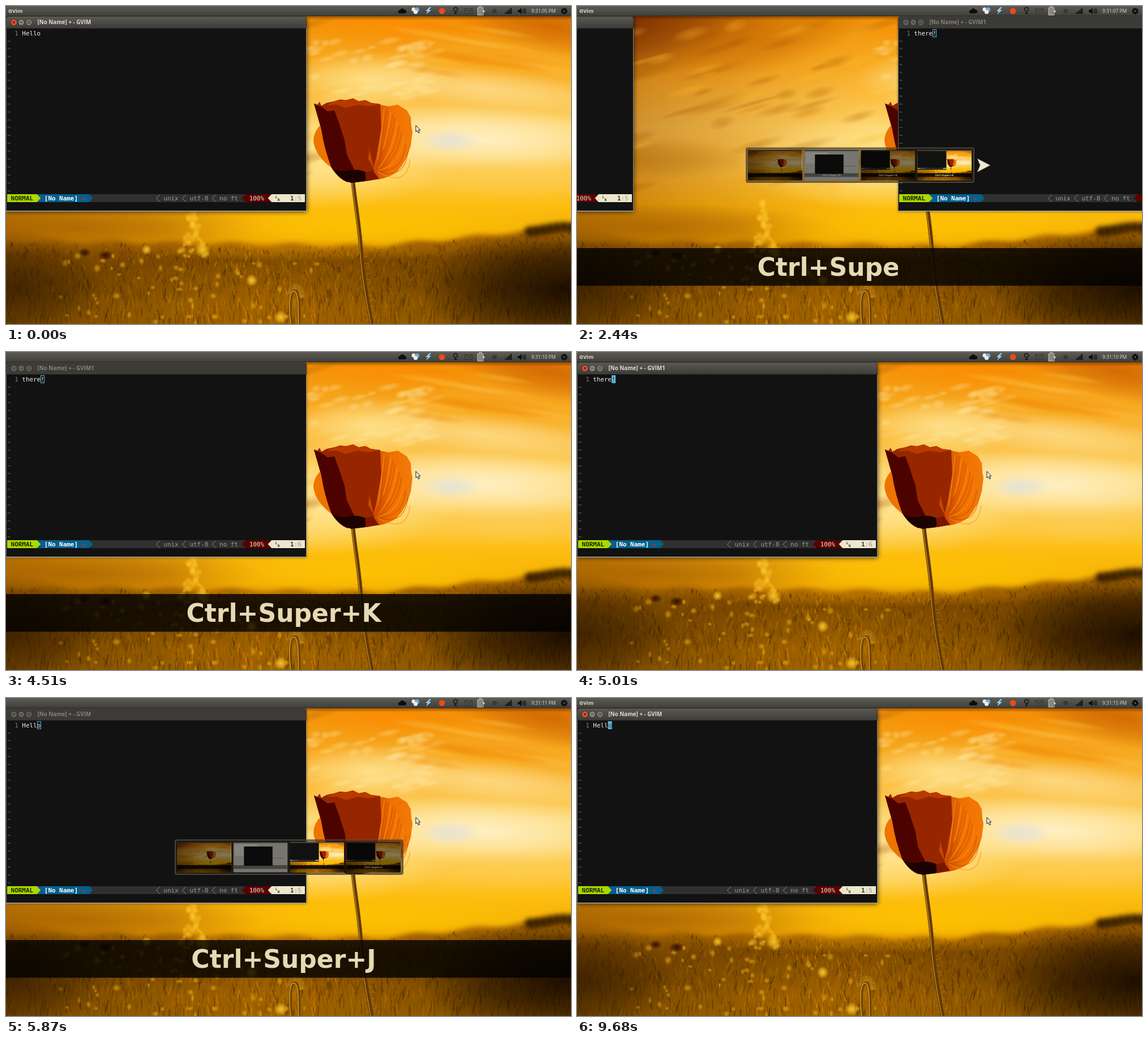
Recreate the animation shown at these times as an HTML page with a canvas. Size 998 by 561 pixels, loop 9.81 s.

```html
<!DOCTYPE html>
<html lang="en">
<head>
<meta charset="utf-8">
<title>Workspace switching</title>
<style>
html, body { margin: 0; width: 100%; height: 100%; overflow: hidden; background: #000; }
canvas { display: block; width: 998px; height: 561px; }
</style>
</head>
<body>
<canvas id="stage" width="998" height="561"></canvas>
<script>
const W = 998, H = 561, LOOP = 9810;
const UI = '"Open Sans", "Noto Sans", sans-serif';
const MONO = '"DejaVu Sans Mono", monospace';
const CELL = 6.58;
const stage = document.getElementById('stage').getContext('2d');
let c = stage;

// ---------- helpers ----------
function rect(x, y, w, h, fill) { c.fillStyle = fill; c.fillRect(x, y, w, h); }

function shape(d, fill, stroke, width = 1) {
  const p = new Path2D(d);
  if (fill) { c.fillStyle = fill; c.fill(p); }
  if (stroke) { c.strokeStyle = stroke; c.lineWidth = width; c.stroke(p); }
}

function disc(x, y, r, fill) {
  c.fillStyle = fill;
  c.beginPath();
  c.arc(x, y, r, 0, 7);
  c.fill();
}

function text(s, x, y, font, fill, align = 'left') {
  c.font = font;
  c.fillStyle = fill;
  c.textAlign = align;
  c.fillText(s, x, y);
}

function ramp(x0, y0, x1, y1, ...stops) {
  const g = c.createLinearGradient(x0, y0, x1, y1);
  stops.forEach(([at, color]) => g.addColorStop(at, color));
  return g;
}

// soft elliptical glow; rgb is "r,g,b"
function glow(x, y, rx, ry, rgb, a, turn = 0) {
  c.save();
  c.translate(x, y);
  c.rotate(turn);
  c.scale(rx, ry);
  const g = c.createRadialGradient(0, 0, 0, 0, 0, 1);
  g.addColorStop(0, `rgba(${rgb},${a})`);
  g.addColorStop(.5, `rgba(${rgb},${a * .6})`);
  g.addColorStop(1, `rgba(${rgb},0)`);
  rect(-1, -1, 2, 2, g);
  c.restore();
}

let seed = 7;
const rnd = () => (seed = seed * 16807 % 2147483647) / 2147483647;
const between = (a, b) => a + (b - a) * rnd();

// ---------- wallpaper ----------
const horizon = x => x < 650 ? 412 + x / 50 : 425 - (x - 650) * .105;

function drawSky() {
  rect(0, 0, W, H, ramp(0, 0, 0, 430, [0, '#f08c00'], [.25, '#f8ac24'], [.5, '#fdd468'],
    [.68, '#fccb4c'], [.82, '#fdbd10'], [1, '#eea600']));
  rect(0, 0, W, H, ramp(0, 0, 520, 0, [0, 'rgba(150,76,0,.62)'], [.5, 'rgba(185,100,0,.35)'], [1, 'rgba(220,130,0,0)']));
  glow(60, 30, 330, 110, '95,22,0', .75, -.15);
  glow(330, 60, 200, 55, '190,95,0', .5, -.25);
  glow(90, 270, 230, 40, '160,88,0', .4);
  glow(130, 390, 330, 42, '150,85,0', .55);
  glow(540, 275, 260, 85, '255,236,165', .75);
  glow(640, 130, 150, 50, '255,236,160', .75);
  glow(840, 145, 230, 36, '255,234,170', .6, .1);
  glow(840, 235, 280, 60, '255,243,205', .9, .04);
  glow(785, 238, 55, 22, '228,226,215', .9);
  glow(900, 305, 220, 36, '255,206,90', .55);
  glow(960, 35, 200, 50, '195,85,0', .65, .2);
  glow(690, 35, 190, 42, '255,138,0', .6);
  glow(640, 390, 350, 45, '255,198,0', .75);
  for (let i = 0; i < 75; i++) {
    const x = between(0, 560), y = between(25, 330);
    const dark = i % 2;
    glow(x, y, between(18, 70), between(4, 13), dark ? '165,84,0' : '255,184,45', dark ? .3 : .35, -.28);
  }
  for (let i = 0; i < 45; i++) {
    glow(between(535, 760), between(60, 165), between(8, 28), between(4, 9), '255,238,175', .35, -.2);
  }
  for (let i = 0; i < 14; i++) {
    glow(between(720, 990), between(30, 130), between(50, 120), between(6, 13), i % 2 ? '240,135,0' : '255,195,70', .4, .15);
  }
}

function drawField() {
  c.save();
  c.filter = 'blur(4px)';
  c.beginPath();
  c.moveTo(-20, H + 20);
  for (let x = -20; x <= W + 20; x += 10) c.lineTo(x, horizon(x) + 3 * Math.sin(x / 17));
  c.lineTo(W + 20, H + 20);
  c.fillStyle = ramp(0, 400, 0, H, [0, '#b87000'], [.25, '#7c4900'], [.6, '#704200'], [1, '#8a5500']);
  c.fill();
  for (let x = 925; x < 1010; x += 12) disc(x, 394 + 4 * Math.sin(x), 9, '#3a2000');
  c.restore();
  glow(470, 520, 360, 85, '200,125,0', .5);
  glow(520, 430, 320, 20, '215,140,0', .5);
  for (let i = 0; i < 2600; i++) {
    const x = between(0, W), top = horizon(x) + 6;
    const y = top + rnd() * (H + 10 - top);
    const light = Math.max(0, 1 - Math.abs(x - 440) / 560);
    const len = 4 + (y - 400) / 11;
    c.strokeStyle = `hsla(37,100%,${6 + rnd() * (16 + 32 * light)}%,.32)`;
    c.lineWidth = between(1, 2.6);
    c.beginPath();
    c.moveTo(x, y);
    c.lineTo(x + between(-5, 5), y - len);
    c.stroke();
  }
  for (let i = 0; i < 60; i++) {
    glow(between(90, 560), between(440, 560), between(3, 8), between(3, 8), '255,190,20', .55);
  }
  for (let i = 0; i < 42; i++) {
    const y = between(345, 445), r = between(3, 9);
    glow(328 + (y - 345) * between(-.25, .3), y, r, r, '255,196,40', .6);
  }
  [[434, 484, 11], [485, 549, 12], [248, 430, 9], [347, 430, 14]].forEach(([x, y, r]) => glow(x, y, r, r, '255,200,40', .95));
  glow(139, 435, 11, 8, '50,15,0', .95);
  glow(176, 440, 13, 9, '50,15,0', .95);
  glow(985, 500, 250, 115, '18,7,0', .85);
  glow(0, 500, 170, 110, '35,16,0', .6);
}

function drawStem(d, width, base, edge) {
  c.lineCap = 'round';
  shape(d, null, base, width);
  c.save();
  c.translate(-width / 4, 0);
  shape(d, null, edge, 1.4);
  c.restore();
}

function drawPoppy() {
  for (let i = 0; i < 34; i++) {
    const y = 400 + i * 4.8, x = 625 + (y - 400) * .13, side = i % 2 ? 1 : -1;
    shape(`M${x} ${y}l${side * between(6, 11)} ${between(-4, 3)}`, null, 'rgba(190,130,30,.75)', .8);
  }
  drawStem('M613 311C617 350 624 385 627 430S637 515 647 566', 7, '#633a00', '#c08a2a');
  for (let i = 0; i < 16; i++) {
    const a = -Math.PI * i / 15;
    shape(`M${511 + 8 * Math.cos(a)} ${507 + 8 * Math.sin(a)}l${8 * Math.cos(a)} ${9 * Math.sin(a)}`, null, '#d0982c', .8);
  }
  drawStem('M505 566C500 535 501 502 510 503S517 535 518 566', 5, '#6e4400', '#dca23a');

  shape('M554 211Q543 224 543 238Q546 266 580 289L570 245Z', '#ee7400');
  shape('M660 174L676 177L692 174L708 184L715 196L716 212L718 222L715 246Q708 274 690 293Q676 303 658 306L645 285Z',
    ramp(655, 0, 718, 0, [0, '#d45700'], [.4, '#f07000'], [1, '#f27a08']));
  for (let i = 0; i < 13; i++) {
    const x = 668 + i * 3.8, y = 182 + i * i * .62;
    shape(`M${x} ${y}Q${x - 6} ${y + 52} 654 291`, null, i % 3 ? 'rgba(190,70,0,.55)' : 'rgba(255,145,30,.7)', 1.4);
  }
  shape('M544 172L550 174L554 169L557 176L566 171L580 168L590 165L601 166L613 163L623 168L635 166L645 171L661 173L663 215L655 262L649 287L659 305L636 309L610 312Q588 306 575 285Q563 255 557 218Z', '#962600');
  shape('M544 172L551 176L556 177L568 186L580 184L588 206L598 236L602 262L615 288L604 311Q588 306 575 285Q563 255 557 218Z', '#4c0300');
  shape('M566 175L580 168L601 166L613 163L623 168L635 166L645 171L661 173L640 177L622 174L600 180L585 174Z', '#b83a00');
  shape('M638 235L642 252L640 270L650 288L644 262Z', '#c84800');
  shape('M650 287L661 262L668 250L656 291L659 305L651 300Z', '#ce4b00');
  shape('M576 286Q592 294 606 290Q624 286 640 296L634 309L610 312Q588 306 576 286Z', '#1c0200');
  shape('M634 294L648 290L659 305L636 309Z', '#7a1600');
}

function drawWallpaper() {
  const canvas = document.createElement('canvas');
  canvas.width = W;
  canvas.height = H;
  c = canvas.getContext('2d');
  drawSky();
  drawField();
  drawPoppy();
  rect(0, 17, W, 8, ramp(0, 17, 0, 25, [0, 'rgba(50,15,0,.5)'], [1, 'rgba(50,15,0,0)']));
  c = stage;
  return canvas;
}
const wall = drawWallpaper();

// ---------- editor window ----------
const col = n => 2 + n * CELL;
const mono = (s, n, y, fill, weight = '') => text(s, col(n), y, `${weight} 10.93px ${MONO}`, fill);

function drawStatus(column) {
  const tip = (n, fill) => shape(`M${col(n) - .5} 332h.5l${CELL} 7l${-CELL} 7h-.5z`, fill);
  const back = (n, fill) => shape(`M${col(n + 1) + .5} 332h-.5l${-CELL} 7l${CELL} 7h.5z`, fill);
  rect(2, 332, 526, 14, '#303030');
  rect(col(8), 332, col(22) - col(8), 14, '#065f8c');
  tip(22, '#065f8c');
  rect(2, 332, col(8) - 2, 14, '#afd700');
  tip(8, '#afd700');
  back(63, '#5a0000');
  rect(col(64), 332, col(71) - col(64), 14, '#5a0000');
  back(70, '#ebe7cd');
  rect(col(71), 332, 528 - col(71), 14, '#ebe7cd');
  [40, 47, 55].forEach(n => shape(`M${col(n + 1)} 333l${-CELL} 6.3l${CELL} 6.3`, null, '#8a8a8a'));
  mono('NORMAL', 1, 343, '#102800', 'bold');
  mono('[No Name]', 10, 343, '#fff', 'bold');
  mono('+', 20, 343, '#e02020', 'bold');
  mono('unix', 42, 343, '#9a9a9a');
  mono('utf-8', 49, 343, '#9a9a9a');
  mono('no ft', 57, 343, '#9a9a9a');
  mono('100%', 65, 343, '#f0e0d0');
  text('L', col(72), 339, `bold 6px ${MONO}`, '#303030');
  text('N', col(72) + 4, 344, `bold 6px ${MONO}`, '#303030');
  mono('1', 76, 343, '#303030', 'bold');
  mono(':' + column, 77, 343, '#9a968a');
}

// cursor is 'block', 'box' or ''
function drawWindow(x, word, title, focused, cursor) {
  if (x <= -540 || x >= W) return;
  c.save();
  c.translate(Math.round(x), 0);
  c.save();
  c.shadowColor = `rgba(0,0,0,${focused ? .75 : .4})`;
  c.shadowBlur = focused ? 8 : 4;
  c.shadowOffsetY = 1;
  shape('M0 362V23Q0 18 5 18H526Q531 18 531 23V362Z', '#3c3b37');
  c.restore();
  if (focused) shape('M1 39V23Q1 19 5 19H526Q530 19 530 23V39Z', ramp(0, 18, 0, 39, [0, '#5b5a53'], [1, '#3d3c38']));
  rect(0, 39.5, 530, 321.5, '#121212');
  rect(0, 361, 531, 1.5, '#aaa59b');
  rect(530, 40, 1, 322, '#8d887e');
  rect(0, 40, .8, 322, '#77736b');

  const gray = focused ? '#85827a' : '#64625d', mark = focused ? '#3a3935' : '#3c3b37';
  [14, 27, 40.5].forEach((bx, i) => {
    disc(bx, 28.7, 5.9, '#2b2a27');
    disc(bx, 28.7, 5.2, focused && !i ? '#e5552f' : gray);
  });
  shape('M12 26.7l4 4m0-4l-4 4', null, focused ? '#5a1505' : mark, 1.2);
  shape('M24.7 28.7h4.6M38.5 26.7h4v4h-4z', null, mark, 1.1);
  text(title, 55.5, 32, `bold 9.8px ${UI}`, focused ? '#dfdbd2' : '#85827a');

  mono('1', 2, 52, '#7c7c7c');
  for (let i = 0; i < 20; i++) text('~', 2, 65.5 + i * 13.9, `bold 10.5px ${MONO}`, '#5c5c5c');
  const n = 3 + word.length;
  if (cursor === 'block') rect(col(n), 41, 7, 14, '#5fb4dc');
  mono(word, 4, 52, '#eee');
  if (cursor === 'block') mono(word.slice(-1), n, 52, '#10303e');
  if (cursor === 'box') {
    c.strokeStyle = '#5fb4dc';
    c.lineWidth = 1;
    c.strokeRect(Math.round(col(n)) + .5, 41.5, 6, 13);
  }
  drawStatus(word.length);
  c.restore();
}

// ---------- panel, caption, switcher ----------
function drawPanel(second, label) {
  const light = '#dfdbd2', dark = '#393834';
  rect(0, 0, W, 18, ramp(0, 0, 0, 18, [0, '#5d5b54'], [.9, '#42413c'], [1, '#2a2926']));
  if (label) text('GVim', 4, 12, `bold 9.5px ${UI}`, light);
  shape('M695 13q-3-1-2-4q1-2 3-2q2-4 6-2q2 1 2 2q4 0 3 4q-1 2-3 2z', '#0c0c0c');
  disc(720, 6, 3.5, '#f0f0ea');
  disc(726, 6.5, 4, '#7ea6d8');
  disc(723.5, 10.5, 3.6, '#e9eef2');
  shape('M748 2l-7 7h4l-3 6l9-8h-4l4-5z', '#8fd0f8');
  disc(770, 9, 5.4, '#e84c1c');
  shape('M794 2.5a3.6 3.6 0 1 0 .1 0M794 10v4M791.5 13h5', null, '#111', 1.4);
  shape('M810.5 4.5h13v9h-13zl6.5 5l6.5-5', null, dark, 1.2);
  shape('M833 3h3v-2h4v2h3v13h-10z', '#8a877e', '#c9c5bb');
  shape('M844 4l-4 6h3l-2 6l6-8h-3z', '#dcd8ce', '#44423d', .6);
  disc(863, 9, 4, dark);
  for (let i = 0; i < 5; i++) rect(881.5 + i * 2.5, 11.5 - i * 2, 1.7, 2.5 + i * 2, '#0c0c0c');
  shape('M904 7h2.5l4-3.5v11l-4-3.5h-2.5z', '#0c0c0c');
  shape('M912 6.5q2 2.5 0 5M914 5q3 4 0 8M916 3.8q4 5 0 10.4', null, '#0c0c0c', 1.1);
  text(`9:31:${String(second).padStart(2, '0')} PM`, 928, 12, `8.4px ${UI}`, light);
  for (let i = 0; i < 8; i++) {
    const a = i * Math.PI / 4;
    shape(`M986 9l${6 * Math.cos(a)} ${6 * Math.sin(a)}`, null, '#0c0c0c', 2.4);
  }
  disc(986, 9, 4.4, '#0c0c0c');
  disc(986, 9, 1.8, '#55534d');
}

function drawCaption(key, edge, showText) {
  rect(0, 427, W, 66.5, 'rgba(0,0,0,.8)');
  if (!showText) {
    rect(edge, 427, W - edge, 66.5, 'rgba(0,0,0,.6)');
    return;
  }
  c.save();
  c.beginPath();
  c.rect(0, 427, edge, 67);
  c.clip();
  text('Ctrl+Super+' + key, 490.5, 475.5, 'bold 44px "DejaVu Sans", sans-serif', '#e6d9b4', 'center');
  c.restore();
}

function drawThumb(i, active, key) {
  const x = 302 + i * 99.8, y = 254, w = 95.5, h = 53.5;
  if (i === 1) {
    rect(x, y, w, h, '#77756f');
    rect(x, y, w, 2, '#3a3935');
    rect(x + 2, y + 4, 40, 20, '#85837d');
    rect(x + 66, y + 28, 24, 1, '#5c5a56');
    rect(x, y + 41, w, 6.5, '#45433f');
    rect(x + 18.5, y + 8, 50.5, 34, '#0b0b0b');
  } else {
    c.drawImage(wall, x, y, w, h);
    rect(x, y, w, 1.7, '#4a4843');
    rect(x, y + 41, w, 6.5, 'rgba(0,0,0,.8)');
    if (i > 1) {
      rect(x, y + 1.7, 51, 33, '#111');
      rect(x, y + 31.8, 51, 1.3, '#404040');
      rect(x, y + 31.8, 5, 1.3, '#afd700');
      rect(x + 5, y + 31.8, 9, 1.3, '#2a80b0');
      rect(x + 45, y + 31.8, 6, 1.3, '#ebe7cd');
    }
    if (i !== active) rect(x, y, w, h, 'rgba(0,0,0,.5)');
  }
  if (i && (key === 'K' || i === 3)) {
    text('Ctrl+Super+' + key, x + w / 2, y + 45.8, 'bold 4.2px "DejaVu Sans", sans-serif', i === active ? '#e6d9b4' : '#99917a', 'center');
  }
}

function drawSwitcher(key, arrow, leaving) {
  c.save();
  if (leaving) {
    c.globalAlpha = .4;
    c.translate(499, 280.5);
    c.scale(.565, .565);
    c.translate(-500, -280.5);
  }
  const frame = new Path2D();
  frame.roundRect(299, 250.5, 402, 60.5, 3);
  c.fillStyle = 'rgba(38,30,20,.55)';
  c.fill(frame);
  c.strokeStyle = 'rgba(82,78,70,.85)';
  c.lineWidth = 2;
  c.stroke(frame);
  for (let i = 0; i < 4; i++) drawThumb(i, key === 'K' ? 3 : 2, key);
  if (arrow) {
    if (key === 'J') { c.translate(W, 0); c.scale(-1, 1); }
    shape('M707 269L730 281L707 293L712 281Z', '#ece6d2', 'rgba(90,80,60,.6)', .8);
  }
  c.restore();
}

// ---------- timeline (ms) ----------
const TICKS = [550, 1540, 2510, 3510, 4510, 5510, 6550, 7510, 8470, 9500];
const BLINKS = [60, 410, 680, 1040, 1290, 1690, 1940, 2360, 8220, 8830, 8990, 9410, 9680];
const AWAY = [2360, 2440, 2510, 2590, 2660];
const BACK = [5510, 5580, 5660, 5730, 5800, 5870];
const count = (list, t) => list.filter(v => v <= t).length;
const inside = (t, a, b) => t >= a && t < b;

// linear slide of 360 ms, refreshed only at the listed moments
function slide(steps, start, t) {
  const n = count(steps, t);
  return n ? Math.min(1, (steps[n - 1] - start) / 360) : 0;
}

function draw(t) {
  const shift = slide(AWAY, 2284.5, t) - slide(BACK, 5506.3, t);
  const leaving = inside(t, 2360, 2660), returning = inside(t, 5510, 5870);
  const sliding = leaving || returning;
  const edge = sliding ? W * (1 - shift) : W;
  const helloFocus = t < 2660 || t >= 8220, thereFocus = inside(t, 5010, 5870);
  const key = inside(t, 2360, 4930) ? 'K' : inside(t, 5510, 8140) ? 'J' : '';
  const lit = count(BLINKS, t) % 2 ? 'block' : '';

  c.drawImage(wall, 0, 0);
  drawWindow(-W * shift, 'Hello', '[No Name] + - GVIM', helloFocus, helloFocus && !key ? lit : 'box');
  drawWindow(W * (1 - shift), 'there!', '[No Name] + - GVIM1', thereFocus, thereFocus && !key ? 'block' : 'box');
  if (key) drawCaption(key, edge, !returning);
  if (inside(t, 2360, 2880)) drawSwitcher('K', sliding, t >= 2810);
  if (inside(t, 5510, 6100)) drawSwitcher('J', sliding, t >= 6020);
  drawPanel(5 + count(TICKS, t), helloFocus || thereFocus);
  if (!sliding) shape('M724 210.5V222l2.6-2.4l1.9 4.4l2-.9l-1.9-4.2h3.2z', '#fff', '#111');
}

const began = performance.now();
(function frame() {
  draw((performance.now() - began) % LOOP);
  requestAnimationFrame(frame);
})();
</script>
</body>
</html>
```
